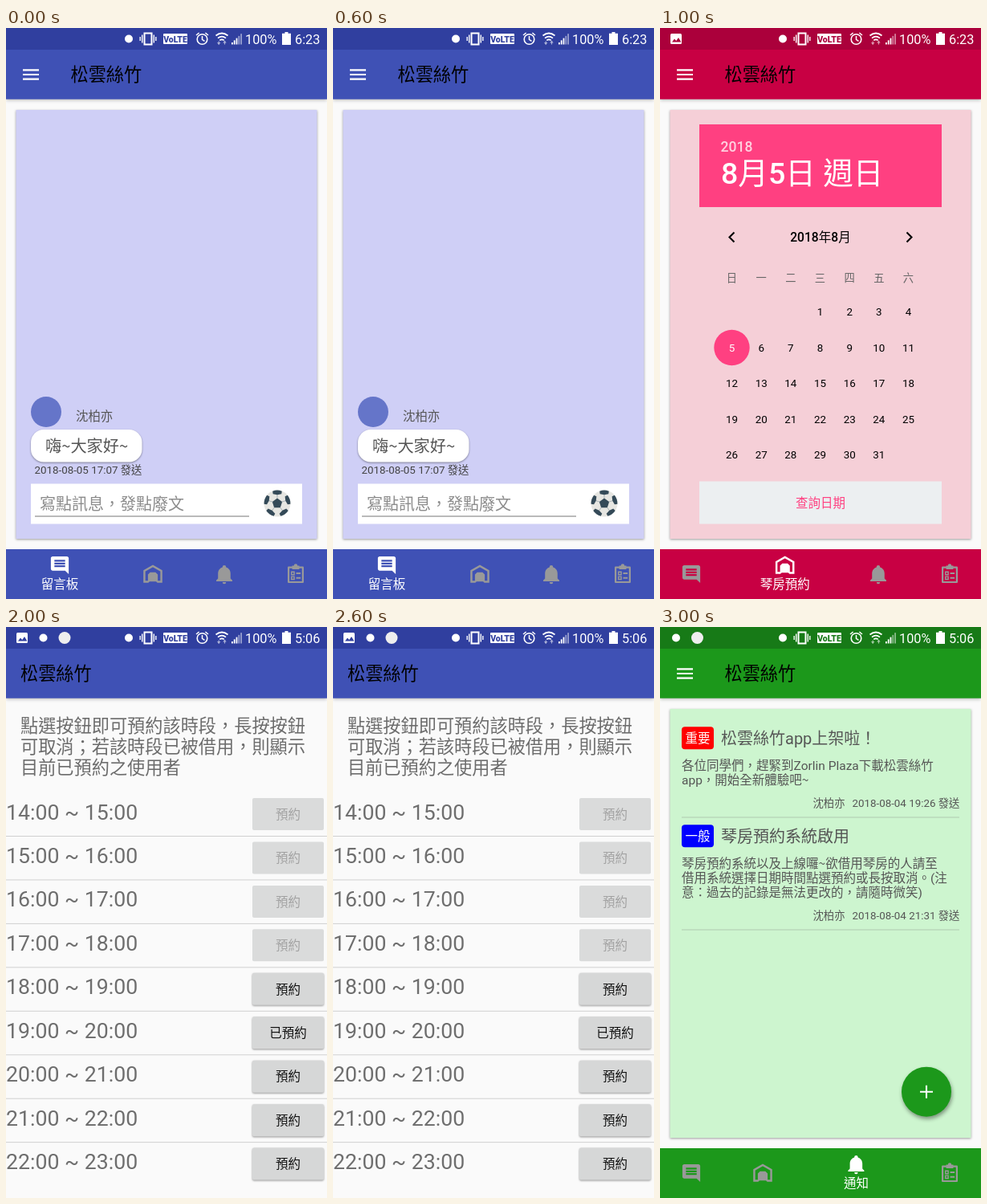
An HTML page for the animation above (4 s loop, 400 by 711 pixels).

```html
<!DOCTYPE html>
<html lang="zh-TW">
<head>
<meta charset="utf-8">
<title>App tour</title>
<style>
html, body { margin: 0; width: 100%; height: 100%; overflow: hidden; background: #fafafa; }
svg { display: block; width: 100%; height: 100%; }
text { font-family: Roboto, 'Noto Sans CJK TC', 'Noto Sans CJK', sans-serif; white-space: pre; }
.k { font-family: 'Noto Sans CJK TC', 'Noto Sans CJK', sans-serif; }
.scene { opacity: 0; animation: turn 4s step-end infinite; }
@keyframes turn { 0% { opacity: 1; } 25%, 100% { opacity: 0; } }
.bar { filter: drop-shadow(0 1px 2px rgba(0,0,0,.28)); }
.card { filter: drop-shadow(0 1px 1.5px rgba(0,0,0,.38)); }
.lift { filter: drop-shadow(0 1px 1px rgba(0,0,0,.4)); }
.fab { filter: drop-shadow(1px 3px 2.5px rgba(0,0,0,.4)); }
</style>
</head>
<body>
<svg id="stage" viewBox="0 0 400 711"></svg>
<script>
const CLUB = '松雲絲竹', USER = '沈柏亦', SHOP = 'Zorlin Plaza';
const PINK = '#ff4081', GREY = '#555';
const BLUE = { bar: '#3f51b5', top: '#303f9f', card: '#cfcff6' };
const RED = { bar: '#c80043', top: '#ab003b', card: '#f5cfd7' };
const GREEN = { bar: '#1c981b', top: '#177a17', card: '#cdf5cf' };

const rect = (x, y, w, h, fill, more = '') =>
  `<rect x="${x}" y="${y}" width="${w}" height="${h}" fill="${fill}" ${more}/>`;
const disc = (x, y, r, fill, more = '') =>
  `<circle cx="${x}" cy="${y}" r="${r}" fill="${fill}" ${more}/>`;
const line = (d, stroke, w = 1, more = '') =>
  `<path d="${d}" fill="none" stroke="${stroke}" stroke-width="${w}" ${more}/>`;
const shape = (d, fill = '#fff') => `<path d="${d}" fill="${fill}"/>`;
const loop = (n, fn) => Array.from({ length: n }, (_, i) => fn(i)).join('');

// Tildes inside Chinese text take the narrower CJK glyph.
function text(x, y, size, fill, str, more = '') {
  if (/[\u4e00-\u9fff]/.test(str)) str = str.replace(/~/g, '<tspan class="k">~</tspan>');
  return `<text x="${x}" y="${y}" font-size="${size}" fill="${fill}" ${more}>${str}</text>`;
}
const mid = (x, y, size, fill, str, more = '') =>
  text(x, y, size, fill, str, 'text-anchor="middle" ' + more);

// Navigation icons on a 24-unit grid
const icons = {
  chat: c => shape('M22 4c0-1.1-.9-2-2-2H4c-1.1 0-2 .9-2 2v12c0 1.1.9 2 2 2h14l4 4zM18 14H6v-2h12zm0-3H6V9h12zm0-3H6V6h12z', c),
  room: c => line('M7 20.5H2.5V8.3L12 3l9.5 5.3v12.2H17', c, 2.2) +
    shape('M6.5 21.6V12.5L9 10h6l2.5 2.5v9.1l-2-1.2h-7z', c),
  bell: c => shape('M21 19v1H3v-1l2-2v-6c0-3.1 2.03-5.83 5-6.71V4a2 2 0 0 1 4 0v.29c2.97.88 5 3.61 5 6.71v6zM14 21a2 2 0 0 1-4 0z', c),
  list: c => line('M4 4.5h16v16.5H4z', c, 2, 'stroke-linejoin="round"') +
    shape('M8 2.5h2a2 2 0 0 1 4 0h2v4H8z', c) +
    line('M7.3 9.6h3v3h-3zM7.3 14.8h3v3h-3z', c, 1.3) +
    line('M12.5 11.1h5M12.5 16.3h5', c, 1.8)
};
const icon = (name, x, y, c) =>
  `<g transform="translate(${x} ${y}) scale(1.111) translate(-12 -12)">${icons[name](c)}</g>`;

const marks = {
  photo: (x, c) => rect(x - 7, 7, 14, 13, '#fff', 'rx="1.5"') +
    shape(`M${x - 5} 17.5l3-4 2.2 2.6 2.8-4 3.4 5.4z`, c),
  dot: x => disc(x, 13.5, 5, '#fff'),
  round: x => disc(x, 13.5, 7.5, '#eee')
};

function status(c, clock, notes) {
  const left = notes.map((n, i) => marks[n](20 + 26.5 * i, c)).join('');
  const w = '#fff';
  return rect(0, 0, 400, 27, c) + left + disc(153, 13.5, 5, w) +
    line('M172.5 6.5h9v14h-9z', w, 2) +
    line('M169.7 8.5v10M184.3 8.5v10M167.2 11v5M186.8 11v5', w, 1.4) +
    rect(196, 7, 30, 13, w, 'rx="1"') +
    mid(211, 17.5, 10.5, c, 'VoLTE', 'font-weight="900"') +
    disc(244.5, 14, 6.3, 'none', `stroke="${w}" stroke-width="1.6"`) +
    line('M244.5 10v4.3l3 2M237 9l3.6-3M252 9l-3.6-3', w, 1.5) +
    line('M261.5 9.5q7.5-6 15 0M264 12.6q5-4 10 0M266.3 15.4q2.7-2 5.4 0', w, 1.7) +
    '<g opacity=".6">' + line('M265.2 20.5v-4M272.5 16.5v4', w, 1.2) +
    shape('M263 18h4.4l-2.2 3zM270.3 18.5h4.4l-2.2-3z') + '</g>' +
    loop(5, i => rect(281 + 2.8 * i, 18 - 2.7 * i, 1.8, 2.5 + 2.7 * i, w, i > 2 ? 'opacity=".5"' : '')) +
    text(298, 19.5, 16.3, w, '100%') +
    shape('M347.5 5h4v1.8h3.5v14.2h-11V6.8h3.5z') +
    text(360, 19.5, 16.3, w, clock);
}

const header = (t, x) => rect(0, 26, 400, 62.7, t.bar, 'class="bar"') +
  text(x, 66, 22.2, '#000', CLUB);

const tabs = [['chat', '留言板'], ['room', '琴房預約'], ['bell', '通知'], ['list', '']];

function nav(t, on) {
  return rect(0, 649, 400, 62, t.bar) + tabs.map(([name, label], i) => {
    if (i === on) {
      const x = 67 + 88.7 * i;
      return icon(name, x, 669, '#fff') + mid(x, 698, 15.5, '#fff', label);
    }
    return icon(name, (i < on ? 39 : 94) + 89 * i, 680, '#999');
  }).join('');
}

const page = (t, on, body) =>
  rect(12.5, 102, 375, 534, t.card, 'class="card"') + body + header(t, 80.5) +
  line('M21 52.4h20M21 58h20M21 63.6h20', '#fff', 2.2) + nav(t, on);

function ball(x, y) {
  const pt = (r, a) => `${(r * Math.sin(a)).toFixed(2)} ${(-r * Math.cos(a)).toFixed(2)}`;
  const step = Math.PI * 2 / 5, dark = '#344a58';
  const penta = 'M' + Array.from({ length: 5 }, (_, i) => pt(6.5, i * step)).join('L') + 'z';
  return `<g transform="translate(${x} ${y})">` + disc(0, 0, 16.5, '#e6e6e2') + shape(penta, dark) +
    loop(5, i => {
      const a = i * step;
      return line(`M${pt(6, a)}L${pt(11, a)}`, '#a9b3b8', 1) +
        shape(`M${pt(10.8, a)}L${pt(13, a + .42)}L${pt(16.4, a + .36)}A16.5 16.5 0 0 0 ${pt(16.4, a - .36)}L${pt(13, a - .42)}z`, dark);
    }) + '</g>';
}

function board() {
  return page(BLUE, 0,
    disc(50, 478, 19, '#6575c9') +
    text(87, 489, 15.4, GREY, USER) +
    rect(31, 500, 138.5, 40.5, '#fff', 'rx="16" class="lift"') +
    text(49, 528, 20.2, GREY, '嗨~大家好~') +
    text(35.5, 555, 13.35, '#444', '2018-08-05 17:07 發送') +
    rect(31, 567.5, 338, 50, '#fff') +
    text(42, 600, 20, '#8c8c8c', '寫點訊息，發點廢文') +
    line('M36 608h267', '#777', 1.1) + ball(338, 592));
}

function calendar() {
  const col = i => 89.5 + 36.67 * i;
  const day = i => {
    const cell = i + 3;
    return mid(col(cell % 7), 358 + 44.5 * Math.floor(cell / 7), 13.4, i === 4 ? '#fff' : '#000', i + 1);
  };
  const bold = s => s.replace(/\d+/g, '<tspan font-weight="500">$&</tspan>');
  return page(RED, 1,
    rect(49, 120, 302, 103, PINK) +
    text(75.5, 154, 17.6, '#ffd0df', '2018', 'font-weight="500"') +
    text(76, 193.5, 37.6, '#fff', bold('8月5日 週日')) +
    line('M92.5 254.5l-6 6 6 6M307.5 254.5l6 6-6 6', '#000', 2.1) +
    mid(200, 266, 15.6, '#000', bold('2018年8月')) +
    loop(7, i => mid(col(i), 316, 13.3, '#666', '日一二三四五六'[i])) +
    disc(89.5, 398, 22.2, PINK) + loop(31, day) +
    rect(49, 564.5, 302, 53, '#eceff1') +
    mid(200, 597, 15.5, PINK, '查詢日期'));
}

function slots() {
  const intro = ['點選按鈕即可預約該時段，長按按鈕', '可取消；若該時段已被借用，則顯示', '目前已預約之使用者'];
  return header(BLUE, 18) +
    intro.map((s, i) => text(18, 130.5 + 26 * i, 22.2, '#6c6c6c', s)).join('') +
    loop(9, i => {
      const y = 54.45 * i, open = i > 3;
      return text(0, 239.5 + y, 26.67, '#6e6e6e', `${14 + i}:00 ~ ${15 + i}:00`) +
        rect(307, 213 + y, 89, 40, open ? '#d6d7d7' : '#dadbdb', 'rx="2"' + (open ? ' class="lift"' : '')) +
        mid(351.5, 238.7 + y, 15.5, open ? '#111' : '#a2a2a2', i === 5 ? '已預約' : '預約') +
        (i < 8 ? line(`M0 ${260.5 + y}h400`, '#d0d0d0') : '');
    });
}

function notice(y, color, tag, title, lines, date) {
  const end = y + 54 + 18 * lines.length;
  return rect(27, y + .3, 40, 28, color, 'rx="4"') +
    mid(47, y + 20, 15.5, '#fff', tag) +
    text(76, y + 22, 20, GREY, title) +
    lines.map((s, i) => text(27, y + 54 + 18 * i, 15.5, GREY, s)).join('') +
    text(190.5, end + 10, 13.35, GREY, USER) +
    text(239.5, end + 10, 13.35, GREY, date + ' 發送') +
    line(`M27 ${end + 23}h346`, '#afc9b0');
}

function news() {
  return page(GREEN, 2,
    notice(124, '#f00', '重要', CLUB + 'app上架啦！',
      [`各位同學們，趕緊到${SHOP}下載${CLUB}`, 'app，開始全新體驗吧~'], '2018-08-04 19:26') +
    notice(246, '#00f', '一般', '琴房預約系統啟用',
      ['琴房預約系統以及上線囉~欲借用琴房的人請至', '借用系統選擇日期時間點選預約或長按取消。(注',
        '意：過去的記錄是無法更改的，請隨時微笑)'], '2018-08-04 21:31') +
    disc(332, 578.7, 31, GREEN.bar, 'class="fab"') +
    line('M324 578.7h16M332 570.7v16', '#fff', 2.1));
}

const scenes = [
  board() + status(BLUE.top, '6:23', []),
  calendar() + status(RED.top, '6:23', ['photo']),
  slots() + status(BLUE.top, '5:06', ['photo', 'dot', 'round']),
  news() + status(GREEN.top, '5:06', ['dot', 'round'])
];
document.getElementById('stage').innerHTML = scenes.map((s, i) =>
  `<g class="scene" style="animation-delay:${i - 4}s">${rect(0, 0, 400, 711, '#fafafa')}${s}</g>`).join('');
</script>
</body>
</html>
```
